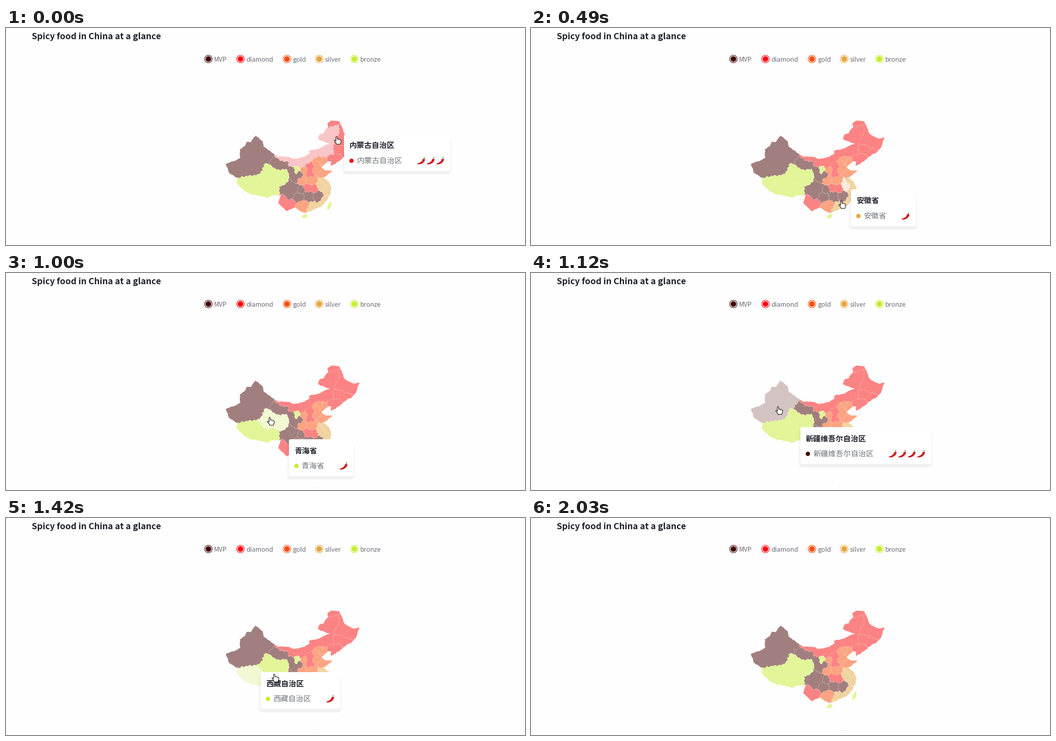
Recreate the animation shown at these times as a matplotlib script. Size 1150 px wide and 483 px high, loop 2.43 s.

```python
import random

import matplotlib.pyplot as plt
import numpy as np
from matplotlib.animation import FuncAnimation
from matplotlib.collections import LineCollection, PolyCollection
from matplotlib.colors import to_rgb
from matplotlib.patches import Circle, Ellipse, FancyBboxPatch, Polygon

W, H, DPI = 1150, 483, 100
LOOP, STEP = 2430, 10
PT = 72 / DPI  # points per pixel

plt.rcParams["font.family"] = "Noto Sans CJK JP"
rng = random.Random(4)

# rank: legend colour, map colour, hovered colour, number of chilies
RANKS = {
    "MVP": ("#440406", "#a17f7e", "#d3c3c3", 4),
    "diamond": ("#fb0410", "#fc8383", "#f9c5c6", 3),
    "gold": ("#fd4d0c", "#fca482", "#fbdcd1", 2),
    "silver": ("#e5a640", "#f1d3a0", "#f9ecda", 1),
    "bronze": ("#c5ee2c", "#e2f598", "#f1f8d2", 1),
}

# Every province is the land closest to one of its centres.
provinces, centres, owners = {}, [], []


def province(name, rank, *spots):
    owners.extend([len(provinces)] * len(spots))
    centres.extend(spots)
    provinces[name] = rank


province("新疆维吾尔自治区", "MVP", (527, 300), (556, 308), (580, 286))
province("甘肃省", "MVP", (598, 298), (615, 303), (635, 318), (640, 334), (651, 326))
province("西藏自治区", "bronze", (538, 360), (560, 346), (592, 362))
province("青海省", "bronze", (582, 318), (574, 332), (592, 330), (616, 327), (612, 338))
province("四川省", "MVP", (620, 360), (632, 350), (640, 358), (630, 372))
province("重庆市", "MVP", (654, 361))
province("贵州省", "MVP", (644, 378), (651, 375))
province("湖南省", "MVP", (670, 375))
province("江西省", "MVP", (693, 375))
province("云南省", "diamond", (614, 385), (632, 390))
province("广西壮族自治区", "gold", (651, 396), (660, 394))
province("广东省", "silver", (680, 400), (690, 403))
province("福建省", "silver", (706, 383))
province("浙江省", "silver", (712, 364))
province("江苏省", "silver", (703, 338), (712, 346))
province("安徽省", "silver", (694, 344), (698, 352))
province("湖北省", "diamond", (668, 355), (682, 355))
province("河南省", "gold", (674, 342), (684, 341))
province("陕西省", "gold", (660, 320), (656, 340))
province("宁夏回族自治区", "bronze", (644, 316))
province("山西省", "diamond", (675, 308), (673, 322))
province("河北省", "gold", (689, 302), (688, 316), (703, 298))
province("北京市", "gold", (696, 297))
province("山东省", "gold", (700, 327))
province("内蒙古自治区", "diamond", (608, 285), (618, 290), (636, 300), (652, 302),
         (668, 293), (685, 277), (704, 276), (717, 270), (723, 245), (730, 228))
province("黑龙江省", "diamond", (724, 208), (746, 228), (738, 251), (757, 257))
province("吉林省", "diamond", (735, 270), (752, 277))
province("辽宁省", "diamond", (722, 294), (735, 292))

COAST = [(487, 303), (510, 294), (519, 289), (518, 270), (529, 263), (533, 253),
         (542, 254), (553, 239), (569, 252), (571, 264), (590, 278), (602, 286),
         (627, 287), (638, 292), (661, 287), (672, 279), (671, 273), (691, 269),
         (717, 257), (691, 248), (695, 237), (703, 235), (714, 219), (712, 212),
         (720, 206), (739, 208), (750, 236), (770, 246), (783, 244), (776, 266),
         (765, 278), (757, 281), (737, 297), (719, 308), (721, 298), (715, 296),
         (699, 310), (706, 316), (723, 318), (704, 334), (714, 341), (721, 355),
         (719, 368), (711, 384), (699, 397), (684, 403), (663, 412), (649, 406),
         (641, 399), (622, 408), (603, 390), (609, 371), (588, 373), (580, 378),
         (553, 371), (546, 372), (527, 362), (511, 346), (513, 335), (494, 322)]

# start ms, pointer centre, hovered province
KEYS = [
    (0, (735, 250), "内蒙古自治区"),
    (130, (722, 263), "内蒙古自治区"),
    (250, (713, 306), "内蒙古自治区"),
    (370, (699, 346), "安徽省"),
    (490, (690, 393), "安徽省"),
    (610, (676, 402), "广东省"),
    (740, (641, 396), None),
    (880, (617, 357), "四川省"),
    (1000, (587, 330), "青海省"),
    (1120, (550, 306), "新疆维吾尔自治区"),
    (1270, (554, 330), "新疆维吾尔自治区"),
    (1420, (597, 356), "西藏自治区"),
    (1570, (702, 393), "四川省"),
    (1730, (628, 412), "广西壮族自治区"),
    (1890, (681, 416), None),
    (2030, None, None),
]
STARTS = [key[0] for key in KEYS]
ENTRY = (739, 223)  # pointer just before the loop begins
RIPPLE_AT = 1270

fig = plt.figure(figsize=(W / DPI, H / DPI), dpi=DPI, facecolor="#fefefe")
ax = fig.add_axes([0, 0, 1, 1])
ax.axis("off")


def label(x, y, text, size, color, weight="normal", z=2):
    return ax.text(x, y, text, fontsize=size * PT, color=color,
                   weight=weight, va="baseline", zorder=z)


def box(color, alpha, z, radius):
    style = f"round,pad=0,rounding_size={radius}"
    return ax.add_patch(FancyBboxPatch((0, 0), 1, 1, boxstyle=style, fc=color,
                                       alpha=alpha, ec="none", zorder=z))


def rough(points):
    """Break straight edges into slightly ragged ones."""
    pts, out = np.array(points, float), []
    for a, b in zip(pts, np.roll(pts, -1, axis=0)):
        d = b - a
        size = np.hypot(*d)
        n = int(size / 3) + 1
        normal = np.array([-d[1], d[0]]) / size
        for k in range(n):
            jig = rng.uniform(-0.8, 0.8) if k else 0
            out.append(a + d * k / n + normal * jig)
    return out


# heading and legend
label(57.3, 25, "Spicy food in China at a glance", 19.2, "#20222d", "bold")
for rank, x in zip(RANKS, (448.5, 519.5, 622.5, 694, 772)):
    color = RANKS[rank][0]
    ax.add_patch(Circle((x, 69), 8.4, fc="white", ec=color, lw=1.2 * PT))
    ax.add_patch(Circle((x, 69), 6.2, fc=color, ec="none"))
    label(x + 12.6, 75, rank, 14.2, "#6c6d74")
ax.plot([0, W], [482.5, 482.5], color="#9b9b9b", lw=PT, zorder=20)
ax.plot([682, 686], [476, 476], color="#eef6cc", lw=PT)

# map
X0, X1, Y0, Y1 = 480, 790, 200, 420
gx, gy = np.meshgrid(np.arange(X0, X1) + 0.5, np.arange(Y0, Y1) + 0.5)
wx = gx + 0.9 * np.sin(0.75 * gy) + 0.6 * np.sin(0.31 * gy + 0.2 * gx)
wy = gy + 0.9 * np.sin(0.7 * gx) + 0.6 * np.sin(0.37 * gx - 0.2 * gy)
dist = np.stack([(wx - x) ** 2 + (wy - y) ** 2 for x, y in centres])
area = np.array(owners)[dist.argmin(axis=0)]
border = np.zeros(area.shape, bool)
border[:, :-1] |= area[:, :-1] != area[:, 1:]
border[:-1] |= area[:-1] != area[1:]

ripple = ax.add_patch(Circle((543, 294), 67.3, fc="#f7f4f3", ec="none", zorder=2))
land = ax.imshow(np.zeros((*area.shape, 3)), extent=(X0, X1, Y1, Y0),
                 aspect="auto", interpolation="nearest", zorder=3)
land.set_clip_path(Polygon(rough(COAST), transform=ax.transData))
for spot, w, h, tilt in (((716.6, 396), 7, 19, 22), ((661.7, 419), 12.5, 8.5, -25)):
    ax.add_patch(Ellipse(spot, w, h, angle=tilt, ec="none", zorder=3,
                         fc=RANKS["bronze"][1]))
ax.set_xlim(0, W)
ax.set_ylim(H, 0)

# tooltip
glow = box("black", 0.018, 5, 9)
shade = box("black", 0.03, 6, 8)
card = box("white", 1, 7, 4)
head = label(0, 0, "", 16.7, "#22252e", "bold", 8)
body = label(0, 0, "", 16.7, "#71737b", z=8)
dot = ax.add_patch(Circle((0, 0), 4.8, ec="none", zorder=8))

# a chili is a quarter arc that tapers towards its tip
s = np.linspace(0, 1, 14)
turn = np.stack([np.cos(s * np.pi / 2), np.sin(s * np.pi / 2)], axis=1)
spine = np.array([-9, -4.5]) + turn * [15, 11]
girth = (2.7 * np.sqrt(1 - s ** 1.5))[:, None] * turn
POD = np.concatenate([spine + girth, (spine - girth)[::-1]])
SHINE = (spine + 0.2 * girth)[2:8]
STALK = np.array([(6, -5), (7, -6.6), (6.4, -9)])
pods = ax.add_collection(PolyCollection([], fc="#c80f14", ec="none", zorder=8))
shines = ax.add_collection(LineCollection([], colors="#e0484e", lw=0.8 * PT, zorder=9))
stalks = ax.add_collection(LineCollection([], colors="#6f9a3a", lw=1.7 * PT, zorder=9))
tooltip = [glow, shade, card, head, body, dot, pods, shines, stalks]

# pointer
HAND = np.array([(-4.2, -7), (-2.7, -8.8), (-1.2, -7), (-1, -2.6), (1, -3.2),
                 (2.6, -2), (4.4, -2.2), (5.5, -1), (7.2, -0.6), (7.5, 3),
                 (6, 6.4), (5.6, 8.8), (-2.6, 8.8), (-3.4, 6.4), (-7.6, 1.6),
                 (-7.2, -0.2), (-5.6, 0), (-4, 2)])
hand = ax.add_patch(Polygon(HAND, closed=True, fc="white", ec="#151515",
                            lw=1.2 * PT, joinstyle="round", zorder=12))


def paint_map(hovered):
    palette = np.array([to_rgb(RANKS[rank][2 if name == hovered else 1])
                        for name, rank in provinces.items()])
    pixels = palette[area]
    pixels[border] = 0.65 * pixels[border] + 0.35 * np.array(to_rgb("#fff0e6"))
    land.set_data(pixels)


def place_tooltip(name, x, y):
    color, _, _, count = RANKS[provinces[name]]
    width = 72.7 + 16.7 * len(name) + 21 * count
    card.set_bounds(x, y, width, 82)
    glow.set_bounds(x - 6, y + 7, width + 9, 83)
    shade.set_bounds(x - 2, y + 8, width + 3, 81)
    head.set_position((x + 11.7, y + 31.5))
    body.set_position((x + 28.5, y + 65))
    head.set_text(name)
    body.set_text(name)
    dot.center = (x + 16.5, y + 59.5)
    dot.set_facecolor(color)
    spots = [np.array([x + width - 23 - 21 * k, y + 60]) for k in range(count)]
    pods.set_verts([POD + p for p in spots])
    shines.set_segments([SHINE + p for p in spots])
    stalks.set_segments([STALK + p for p in spots])


def draw(i):
    k = np.searchsorted(STARTS, i * STEP, "right") - 1
    start, pointer, hovered = KEYS[k]
    paint_map(hovered)
    for part in tooltip:
        part.set_visible(hovered is not None)
    if hovered:
        # the tooltip trails one pointer move behind
        px, py = KEYS[k - 1][1] if k else ENTRY
        place_tooltip(hovered, px + 10, py + 13)
    ripple.set_visible(start == RIPPLE_AT)
    hand.set_visible(pointer is not None)
    if pointer:
        hand.set_xy(HAND + np.array(pointer))
    return []


anim = FuncAnimation(fig, draw, frames=LOOP // STEP, interval=STEP,
                     init_func=lambda: draw(0), repeat=True, repeat_delay=0)
plt.show()
```
